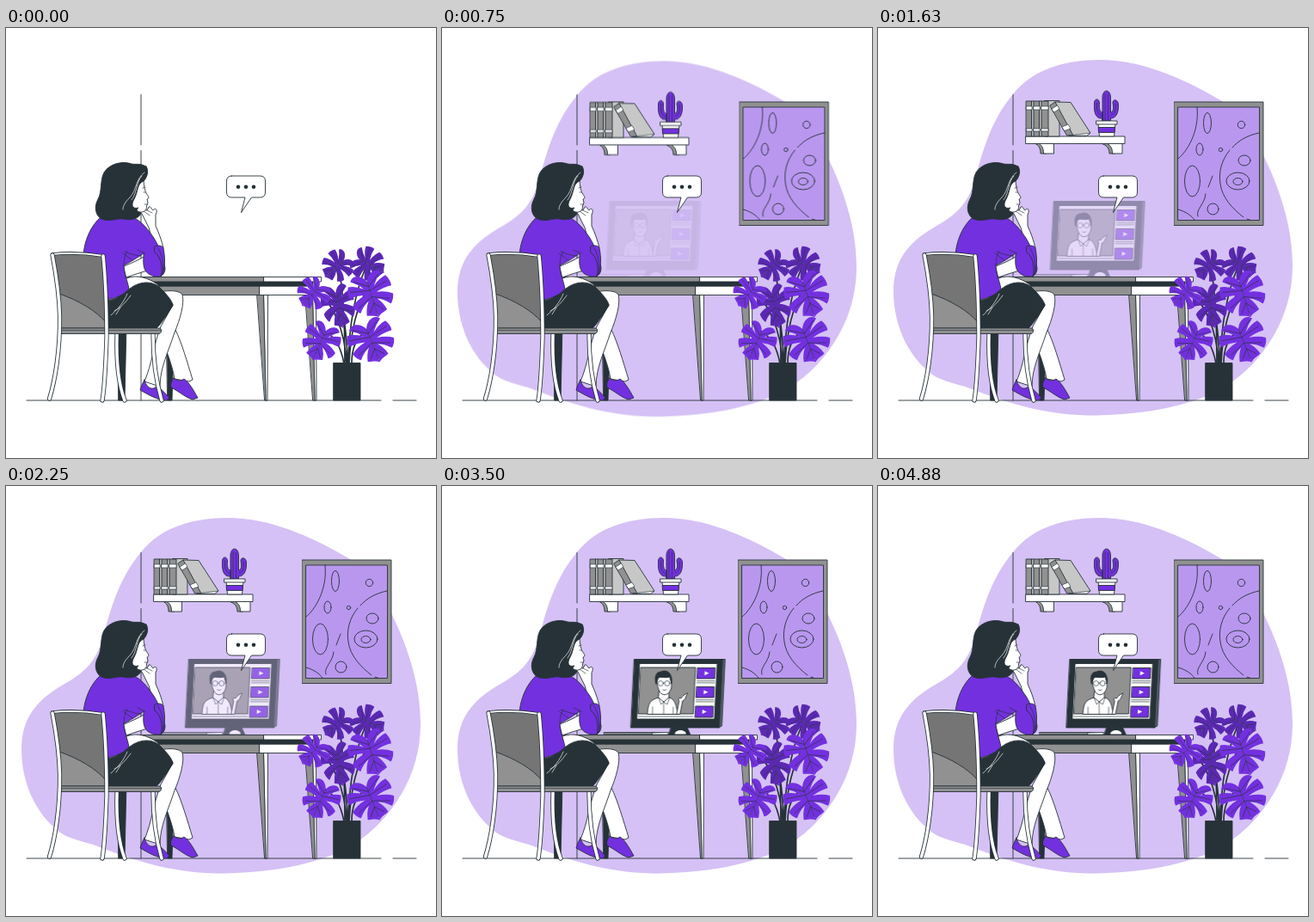
An HTML page that plays this animation: 500x500 px, repeating every 4.93 s.

```html
<!DOCTYPE html>
<html lang="en">
<head>
<meta charset="utf-8">
<title>Online lesson</title>
<style>
html, body { margin: 0; width: 100%; height: 100%; overflow: hidden; background: #fff; }
svg { display: block; width: 100%; height: 100%; }
:root { --ink: #263238; --violet: #7330df; --deep: #5b28b4; --gray: #919191; }
.scene { stroke: var(--ink); stroke-width: .9; stroke-linecap: round; stroke-linejoin: round; fill: none; }
.w { fill: #fff; } .k { fill: var(--ink); } .v { fill: var(--violet); }
.d { fill: var(--deep); } .g { fill: var(--gray); } .l { fill: #c7c7c7; }
.n { stroke: none; } .thin { stroke-width: .65; } .light { stroke: #fff; }
.edge { stroke: var(--ink); stroke-width: 5.2; } .core { stroke: #fff; stroke-width: 3.5; }
.drop, .slide, .enter { animation: drop 4930ms infinite; }
.slide { animation-name: slide; }
.enter { animation-name: enter; animation-timing-function: cubic-bezier(.36, -.01, .5, 1.38); }
/* the two quick entrances take 1 s, then rest */
@keyframes drop {
  0% { opacity: 0; transform: translateY(-30px); animation-timing-function: cubic-bezier(.36, -.01, .5, 1.38); }
  20.284%, 100% { opacity: 1; transform: translateY(0); }
}
@keyframes slide {
  0% { opacity: 0; transform: translateX(-30px); animation-timing-function: cubic-bezier(.36, -.01, .5, 1.38); }
  20.284%, 100% { opacity: 1; transform: translateX(0); }
}
@keyframes enter {
  from { opacity: 0; transform: translateX(-30px); }
  to { opacity: 1; transform: translateX(0); }
}
</style>
</head>
<body>
<svg viewBox="0 0 500 500">
<defs>
  <path id="half" d="M0-14C-4-24-16-28-21-20Q-13-15-7-7Q-17-14-26-15C-29-10-30-5-29-1Q-18-2-8 1Q-20 3-28 9C-27 14-24 18-21 20Q-14 12-6 9Q-12 16-14 25C-10 27-4 27 0 31Z"/>
  <path id="veins" d="M0-14V26M0-8L-17-19M0-8L17-19M0-3L-25-8M0-3L25-8M0 5L-21 13M0 5L21 13M0 13L-9 23M0 13L9 23"/>
  <g id="leaf">
    <g stroke="none"><use href="#half"/><use href="#half" transform="scale(-1 1)"/></g>
    <use href="#veins" fill="none" stroke-width=".65"/>
  </g>
  <g id="tile">
    <path class="v" d="M0 0h20.5v12.5H0z"/>
    <path class="w n" d="M8.5 3.8v5l5-2.5z"/>
    <path class="thin" d="M0 15.2h20.5M0 17.4h20.5"/>
  </g>
  <path id="chairBack" d="M54 264C58 285 62 310 62.500 335C63 375 57 410 50.500 431M113 265C116 295 117 335 117 360C116 390 115 415 112 433"/>
  <path id="chairFront" d="M129 356C128 390 131 415 138 433M171 356C171 388 175 413 181 433"/>
</defs>

<path class="drop" fill="#d5c1f5" d="M157 77C180 48 217 37 258 37C304 37 352 57 393 81C424 98 436 118 449 150C466 185 482 229 482 277C482 335 450 387 404 417C362 442 300 450.500 244 450.500C190 449 148 435 112 421C98 415 83 413 68 406C39 388 18 350 18 306C18 266 40 246 70 229C94 215 106 202 114 172C123 137 134 104 157 77Z"/>

<g class="scene">
  <path d="M157 77.500V136M157 142.500V433M24 433H436M450 433H477"/>

  <g class="drop">
    <path class="g" d="M182 134C187 136 189 140 189 146H196V134ZM259 134C266 136 269 140 269 146H276V134Z"/>
    <path class="w" d="M189 134H204.500V146H192.500C192.500 140 191 137 187 134ZM269 134H284V146H272.500C272.500 140 271 137 266 134Z"/>
    <path class="w" d="M172 126H287V134.500H172Z"/>
    <path class="l" d="M194 84.500H211V126H194Z"/>
    <path class="g" d="M172.500 85H179V126H172.500ZM181 85H188V126H181ZM190 85H198V126H190Z"/>
    <path class="l" d="M179 85H181V126H179ZM188 85H190V126H188Z"/>
    <path class="w thin" d="M172.500 91H179V95H172.500ZM172.500 117H179V120H172.500ZM181 91H188V95H181ZM181 117H188V120H181ZM190 91H198V95H190ZM190 117H198V120H190Z"/>
    <path class="l" d="M206 86L224 86.500L247 122L243 125H222Z"/>
    <path class="g" d="M200 90L206 86L227 125H220Z"/>
    <path class="w thin" d="M202 94L208.500 90L211 94L205 98ZM214 115L221 112L224 117L217 119.500ZM222 125L244 122.500L247 122L243 125Z"/>
    <path class="v" d="M261 108V81C261 70.500 270.500 70.500 270.500 81V98C274 97 274 93 273 87C273 82 279.500 83 279.500 89C280 100 276 105 270.500 105V108H261V105C253 106 251 98 251.500 88C251 82 257 81 257.500 87C257 94 258 98 261 98Z"/>
    <path class="thin" d="M264 77V107M267.500 77V107M254.500 87C254 97 256 101 261 102M276 88C277 97 275 100 271 101"/>
    <path class="w" d="M256 111L257.500 126H274.500L276 111Z"/>
    <path class="v" d="M256.500 115.500H275.500L275 121.500H257Z"/>
    <path class="w" d="M254 108H278V112H254Z"/>
  </g>

  <g class="slide">
    <path class="g" d="M344.500 86H448V229.500H344.500Z"/>
    <path d="M349 92H443.500V223.500H349Z" fill="#b997ef"/>
    <path d="M349 152C359 144 374 121 371 92M443 122C429 125 419 131 412 139M409 142C399 154 396 168 398 181C400 197 412 210 425 220M429 222L433 223.500M372 219C369 211 380 205 381 193M384 185L389 172M349 211C359 214 364 218 368 223"/>
    <ellipse cx="383" cy="110.500" rx="4.500" ry="12"/>
    <ellipse cx="374" cy="141" rx="4" ry="7"/>
    <ellipse cx="365.500" cy="178" rx="9" ry="18"/>
    <ellipse cx="426" cy="154" rx="7" ry="6"/>
    <ellipse cx="418.500" cy="178" rx="13.500" ry="10"/>
    <ellipse cx="418.500" cy="178.500" rx="5.500" ry="4"/>
    <circle cx="422.500" cy="112.500" r="4.200"/>
    <circle cx="398.500" cy="141.500" r="2.200"/>
    <circle cx="389.500" cy="210.500" r="6.500"/>
  </g>

  <!-- desk -->
  <path class="k" d="M130 300H141L138 433H131ZM186 310H197L193 433H188Z"/>
  <path class="g" d="M292 310H300L303 433H301ZM348 310H357L360 433H357Z"/>
  <path class="w" d="M300 310H304.500L304 433H302.500ZM357 310H360.500L361 433H359.500Z"/>
  <path class="g" d="M140 300H295V310.500H140Z"/>
  <path class="w" d="M295 300H357V310.500H295Z"/>
  <path class="k" d="M136 295H357V300H136Z"/>
  <path class="g" d="M136 289.500H300V295H136Z"/>
  <path class="w" d="M300 289.500H366.500V295H300Z"/>

  <g class="enter">
    <path class="g" d="M187.500 286.500H262V289H187.500Z"/>
    <path class="w thin" d="M244 287L262 286.500V289H244Z"/>
    <path class="k" d="M266 280H284L288 289H263Z"/>
    <path class="w n" d="M270 288.500C270 282.500 283 282.500 283 288.500Z"/>
    <g transform="matrix(1 0 -.05 1 14.050 0)">
      <path d="M321 201.500H324.500V279L321 281Z" fill="#55606a"/>
      <path class="k" d="M219 201.500H321.500V281H219Z"/>
      <path class="w" d="M225.500 206.500H315.500V271H225.500Z"/>
      <path class="g" d="M227 211H290.500V265H227Z"/>
      <path class="thin" d="M227 268H290.500"/>
      <use href="#tile" x="293" y="211.500"/>
      <use href="#tile" x="293" y="233.500"/>
      <path class="v" d="M293 256H313.500V269H293Z"/>
      <path class="w n" d="M301 260V265L306 262.500Z"/>
    </g>
    <path class="w" d="M238 265C239 252 241 249 251 246H264C271 249 272 257 273 265Z"/>
    <path class="w" d="M272 265L275 250C273 247 275 246 277 247C279 244 283 241 285 241C282 245 283 248 279 250L276 265Z"/>
    <path class="w" d="M252 238H263V246L257 251L251 246Z"/>
    <path class="w" d="M249 223C250 219 265 219 266 224V234C264 242 259 244 255 242C250 238 249 230 249 223Z"/>
    <path class="k" d="M248 230C246 222 248 216 254 216C260 213 268 217 266 230L264 222C258 224 254 221 251 223Z"/>
    <g class="thin">
      <circle class="w" cx="253.500" cy="229.500" r="3"/><circle class="w" cx="261" cy="229.500" r="3"/>
      <path d="M256.500 229H258M256 237Q258 238.500 260 237M251 246L254 254L257 251L261 254L264 246M257 251V265M244 257V265M268 257V265"/>
    </g>
  </g>

  <!-- woman -->
  <path class="w" d="M178 350C184 371 193 389 196 408L213 411L217 409C211 389 204 365 197 351Z"/>
  <path class="w" d="M180 307C191 304 203 306 205 310C208 320 202 340 196 354C189 376 179 395 179 417L161 411C170 390 171 370 180 347L194 322Z"/>
  <path class="v" d="M161 409C159 413 157 417 156 421C165 426 176 433 187 433L190 430C185 424 179 419 176 416C171 422 163 419 161 409Z"/>
  <path class="v" d="M195 407C192 411 191 414 192 418C202 423 209 430 217 432L223 430C218 421 213 412 207 408C203 411 198 410 195 407Z"/>
  <path class="w" d="M137 277C147 273 158 268 165 263L171 280C162 283 150 286 140 290Z"/>
  <path class="w" d="M140 291C153 286 166 291 176 298L181 306L141 305Z"/>
  <path class="k" d="M117 317C127 316 137 310 144 303C157 293 173 294 181 304C187 310 194 318 194 323C188 331 181 344 175 349H117Z"/>
  <path class="light thin" d="M122 334C130 327 137 319 141 309M126 329C134 325 139 319 145 311M128 333L133 325"/>
  <path class="w" d="M166 232L158 216C155 214 159 211 164 212L166 208C169 207 169 211 171 212C174 208 177 212 174 217V230C178 239 181 247 183 256L174 261Z"/>
  <path class="thin" d="M160 213L167 218M164 212L170 215"/>
  <path class="v" d="M111 219C98 230 91 248 90 264L115 266L118 316C128 314 138 310 143 303C141 293 137 285 137 276C149 270 157 264 160 262C160 271 158 281 166 286C174 291 185 291 185 279C183 268 177 250 169 240C162 230 154 222 145 219Z"/>
  <path class="v" d="M173 254C177 252 182 253 183 256C185 266 186 282 180 289C183 279 180 265 173 261Z"/>
  <path class="thin" d="M137 276C137 270 138 264 141 260M138 260C146 263 151 265 157 265M162 262L153 258M136 262L147 270M176 255C182 263 184 276 182 285"/>
  <path class="w" d="M143 178L160 174C160 181 161 188 163 192C166 196 167 198 164 199L165 203L163.500 207C164 211 161 215 155 214L146 215Z"/>
  <path class="thin" d="M161 205H164M159 186L162 185M160 191H162"/>
  <path class="k" d="M163 161C156 157 151 159 146 158C135 154 120 158 114 168C109 177 112 190 107 199C102 208 104 218 111 222C121 226 128 221 136 222C145 224 155 222 157 215C154 213 150 213 154 209C147 211 145 206 149 199C154 190 152 181 160 178C165 173 166 165 163 161Z"/>
  <path class="light thin" d="M161 168C150 176 153 187 144 197C138 203 136 207 136 211M158 172C151 179 153 191 146 200"/>

  <!-- chair -->
  <path d="M54 263C72 261 95 262 113 265L117 349H64C64 319 59 290 54 263Z" fill="#757575"/>
  <path class="g" d="M62 309C85 317 105 329 116 342L117 349H64C64 335 63 322 62 309Z"/>
  <use href="#chairFront" class="edge"/><use href="#chairFront" class="core"/>
  <path class="g" d="M64 349H178C182 349 181 355 178 355.500H64Z"/>
  <path class="thin" d="M64 351.500H180"/>
  <path d="M54 263C72 261 95 262 113 265" class="edge" style="stroke-width:3.4"/>
  <path d="M54 263C72 261 95 262 113 265" class="core" style="stroke-width:1.8"/>
  <use href="#chairBack" class="edge"/><use href="#chairBack" class="core"/>

  <!-- speech bubble -->
  <path class="w" d="M262.500 172H295.500Q301.500 172 301.500 178V191Q301.500 197 295.500 197H285.500L273.500 214.500L278 197H262.500Q256.500 197 256.500 191V178Q256.500 172 262.500 172Z"/>
  <g class="k n"><circle cx="270" cy="184.700" r="2.300"/><circle cx="279" cy="184.700" r="2.300"/><circle cx="288" cy="184.700" r="2.300"/></g>

  <!-- plant -->
  <path stroke-width="1.700" d="M394 390C394 350 393 310 387 278M398 390C399 345 405 310 418 279M396 390C394 350 380 321 362 305M399 390C401 350 408 325 420 304M393 390C389 369 381 357 370 353M402 390C402 370 408 360 417 354M397 390C397 360 393 335 389 312"/>
  <g class="d">
    <use href="#leaf" transform="translate(386 276) rotate(48) scale(.62 .66)"/>
    <use href="#leaf" transform="translate(420 274) rotate(-62) scale(.66 .72)"/>
    <use href="#leaf" transform="translate(386 321) rotate(-12) scale(.66 .92)"/>
  </g>
  <g class="v">
    <use href="#leaf" transform="translate(358 308) rotate(42) scale(.66)"/>
    <use href="#leaf" transform="translate(424 308) rotate(-18) scale(.88 .96)"/>
    <use href="#leaf" transform="translate(367 363) rotate(24) scale(.74 .82)"/>
    <use href="#leaf" transform="translate(424 362) rotate(-22) scale(.92)"/>
  </g>
  <path class="k" d="M381 389.500H412V433H381Z"/>
</g>
</svg>
</body>
</html>
```
